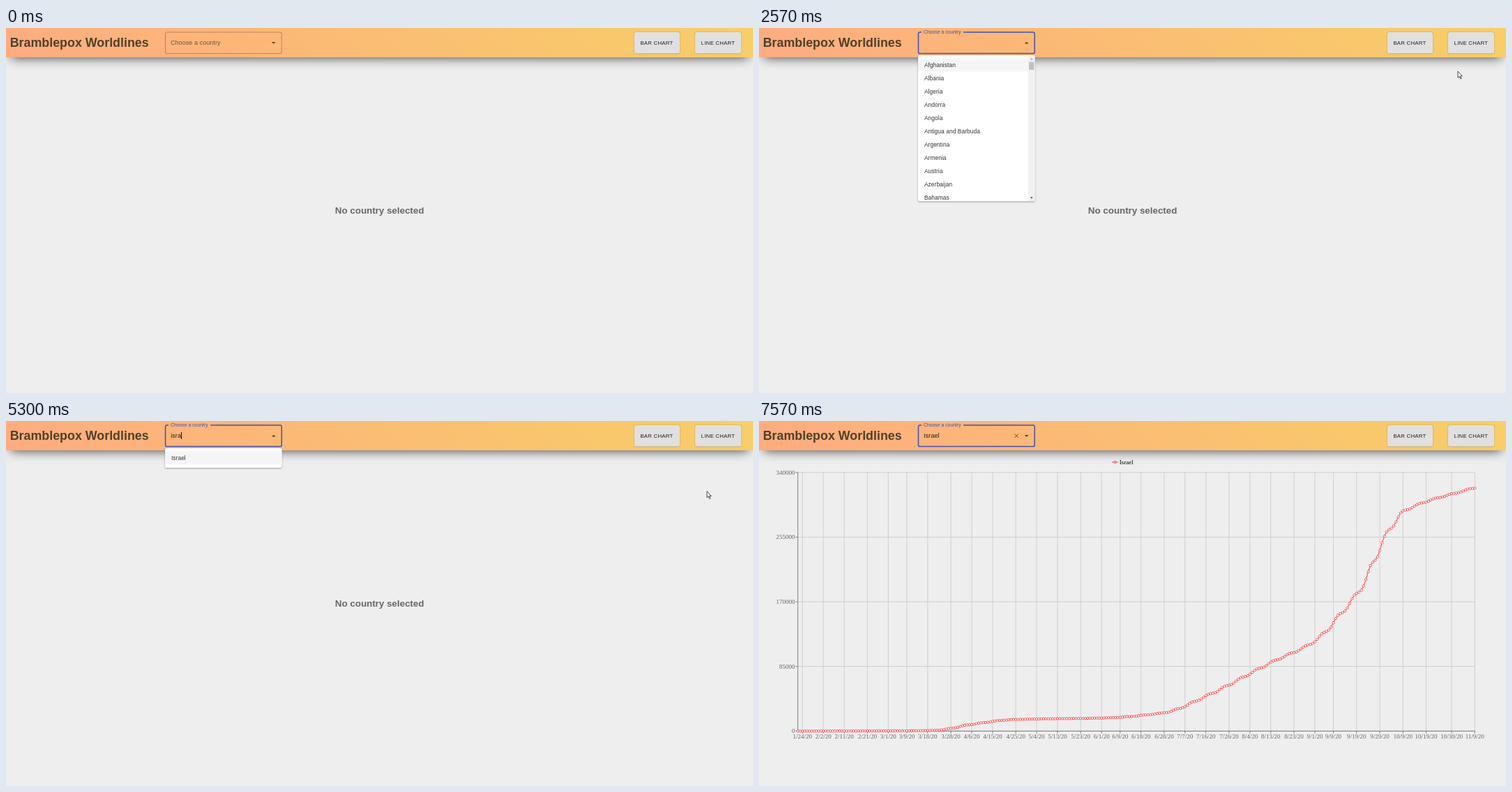
An HTML page that plays this animation: 1071 px wide and 523 px high, repeating every 8000 ms.

```html
<!DOCTYPE html>
<html lang="en">
<head>
<meta charset="utf-8">
<title>Bramblepox Worldlines</title>
<style>
html, body { margin: 0; width: 100%; height: 100%; overflow: hidden; background: #eee; }
header {
  position: absolute; left: 0; top: 0; width: 1071px; height: 42px;
  background: linear-gradient(45deg, #ffab80, #f7cf67);
  box-shadow: 0 8px 16px -7px rgba(0, 0, 0, .7);
}
svg { position: absolute; left: 0; top: 0; display: block; }
text { font-family: "Liberation Sans", Arial, sans-serif; white-space: pre; }
.title { font-size: 17.85px; font-weight: bold; fill: #4e412b; }
.field { font-size: 8.96px; letter-spacing: .084px; }
.option { font-size: 8.4px; letter-spacing: .07px; fill: #333; }
.button rect {
  fill: #e0e0e0;
  filter: drop-shadow(0 .8px .6px rgba(0, 0, 0, .3)) drop-shadow(0 .5px 1.2px rgba(0, 0, 0, .2));
}
.button text { font-size: 7.84px; letter-spacing: .224px; fill: #212121; }
.empty { font-size: 13.35px; font-weight: bold; fill: #666; text-anchor: middle; }
.paper { fill: #fff; filter: drop-shadow(0 1px 1px rgba(0, 0, 0, .35)); }
#chart text { font-family: "Liberation Serif", "Times New Roman", serif; font-size: 9px; fill: #666; }
.grid { stroke: #ccc; stroke-width: .9; fill: none; }
.axis { stroke: #666; stroke-width: .8; fill: none; }
.red { stroke: #f00; stroke-width: .75; fill: none; }
#dots circle { stroke: #f00; stroke-width: .6; fill: #fff; }
</style>
</head>
<body>
<header></header>
<svg width="1071" height="523" viewBox="0 0 1071 523">
  <defs>
    <clipPath id="selClip"><rect id="selArea" x="471.5" y="254" height="15.6"/></clipPath>
    <clipPath id="listClip"><rect id="listArea" x="228" y="39" width="167.5"/></clipPath>
  </defs>

  <text class="title" x="5.7" y="27">Bramblepox Worldlines</text>
  <g class="button">
    <rect x="901" y="6" width="65" height="30.5" rx="2.2"/><text x="909.4" y="24.2">BAR CHART</text>
    <rect x="988" y="6" width="66" height="30.5" rx="2.2"/><text x="996.6" y="24.2">LINE CHART</text>
  </g>

  <g id="empty">
    <text class="empty" x="535.6" y="266.3">No country selected</text>
    <g clip-path="url(#selClip)">
      <rect x="471.5" y="254" width="128.2" height="15.6" fill="#3390ff"/>
      <text class="empty" x="535.6" y="266.3" style="fill:#fff">No country selected</text>
    </g>
    <rect id="badge" x="529" y="275" width="13" height="13" fill="#45dcc0"/>
  </g>

  <g id="chart">
    <g id="axes"></g>
    <path id="line" class="red"/>
    <g id="dots"></g>
    <path class="red" d="M506.3 59H508.8M511.8 59H514.3"/>
    <circle class="red" cx="510.3" cy="59" r="1.5"/>
    <text x="516.7" y="61.8" style="fill:#000">Israel</text>
  </g>

  <path id="border" fill="none"/>
  <text id="label" class="field">Choose a country</text>
  <text id="input" class="field" x="236.2" y="24.2" fill="#212121"></text>
  <rect id="caret" y="16" width="1" height="10" fill="#111"/>
  <path id="arrow" fill="#000" fill-opacity=".65"/>
  <path id="clear" d="M366.3 18.4l5.6 5.6m0-5.6l-5.6 5.6" stroke="#000" stroke-opacity=".6" stroke-width=".9"/>

  <g id="menu">
    <rect id="paper" class="paper" x="228" y="39" width="167.5" rx="2.2"/>
    <rect id="active" x="228" y="43.5" height="19" fill="#f5f5f5"/>
    <g id="options" clip-path="url(#listClip)"></g>
    <g id="scroll">
      <rect x="386.2" y="39.5" width="9.3" height="208.5" fill="#f1f1f1"/>
      <rect x="387" y="48.6" width="7.3" height="11.4" fill="#c1c1c1"/>
      <path d="M388.8 45.5h4l-2-2.4z" fill="#a3a3a3"/>
      <path d="M388.8 242.3h4l-2 2.4z" fill="#505050"/>
    </g>
  </g>

  <path id="cursor" d="M0 0V9.2L2.1 7.4 3.6 10.8 4.9 10.2 3.5 6.9H6.2Z" fill="#fff" stroke="#111" stroke-width=".75"/>
</svg>
<script>
const LOOP = 8000, TICK = 200 / 3, BLINK = 530;
const PICK = 5960; // moment the country is chosen
const $ = id => document.getElementById(id);
const show = (id, on) => $(id).setAttribute('display', on ? 'inline' : 'none');
const set = (id, attrs) => { for (const k in attrs) $(id).setAttribute(k, attrs[k]); };
const mix = (a, b, p) => a + (b - a) * p;
const between = (t, a, b) => t >= a && t < b;
const progress = (t, a, b) => Math.min(1, Math.max(0, (t - a) / (b - a)));

function bezier(x1, y1, x2, y2) {
  const at = (a, b, s) => 3 * a * s * (1 - s) ** 2 + 3 * b * s * s * (1 - s) + s ** 3;
  return x => {
    let lo = 0, hi = 1;
    for (let i = 0; i < 24; i++) {
      const mid = (lo + hi) / 2;
      if (at(x1, x2, mid) < x) lo = mid; else hi = mid;
    }
    return at(y1, y2, lo);
  };
}
const ease = bezier(.25, .1, .25, 1);
const easeOut = bezier(0, 0, .2, 1);

// Chart
const LEFT = 55.7, RIGHT = 1026.3, TOP = 73.8, BOTTOM = 444.3, DAYS = 292;
const dayX = d => mix(LEFT, RIGHT, d / DAYS);

// Day and height of the curve at its main bends.
const bends = [[0, 0], [47, .4], [60, 1.2], [75, 9.7], [94, 16.7], [131, 18.7], [158, 26.3],
  [176, 50], [204, 98], [223, 129], [235, 171], [244, 211], [253, 276], [262, 316], [292, 349]];
const secant = i => (bends[i + 1][1] - bends[i][1]) / (bends[i + 1][0] - bends[i][0]);

function slope(i) {
  if (i === 0) return secant(0);
  if (i === bends.length - 1) return secant(i - 1);
  const a = secant(i - 1), b = secant(i);
  return 2 * a * b / (a + b);
}

function curveY(day) {
  // Counts rise more slowly at weekends.
  const d = Math.min(DAYS, Math.max(0, day - .75 * Math.sin(2 * Math.PI * (day - 262.5) / 7)));
  const i = Math.max(0, bends.findIndex(b => b[0] >= d) - 1);
  const [d0, h0] = bends[i], [d1, h1] = bends[i + 1];
  const span = d1 - d0, s = (d - d0) / span;
  return BOTTOM - mix(h0, h1, s * s * (3 - 2 * s))
    - span * s * (1 - s) * ((1 - s) * slope(i) - s * slope(i + 1));
}

function dateLabel(d) {
  const date = new Date(Date.UTC(2020, 0, 22 + d));
  return `${date.getUTCMonth() + 1}/${date.getUTCDate()}/20`;
}

// From the last day backwards, keep each date whose label has room.
function pickTicks() {
  const width = d => (dateLabel(d).length - 2) * 4.5 + 5;
  const days = [DAYS];
  for (let d = DAYS - 1; d > 0; d--) {
    const last = days[days.length - 1];
    if (dayX(last) - dayX(d) >= (width(last) + width(d)) / 2 + 2.8) days.push(d);
  }
  return days;
}

function buildChart() {
  let grid = '', ticks = '', labels = '';
  for (const d of pickTicks()) {
    const x = dayX(d).toFixed(2);
    grid += `M${x} ${TOP}V${BOTTOM}`;
    ticks += `M${x} ${BOTTOM}v3.4`;
    labels += `<text x="${x}" y="455" text-anchor="middle">${dateLabel(d)}</text>`;
  }
  for (let i = 0; i <= 4; i++) {
    const y = mix(BOTTOM, TOP, i / 4);
    grid += `M${LEFT} ${y}H${RIGHT}`;
    ticks += `M${LEFT} ${y}h-3.4`;
    labels += `<text x="51.4" y="${y + 3}" text-anchor="end">${i * 85000}</text>`;
  }
  $('axes').innerHTML = `<path class="grid" d="${grid}"/>` +
    `<path class="axis" d="${ticks}M${LEFT} ${TOP}V${BOTTOM}H${RIGHT}"/>` + labels;

  const points = Array.from({ length: DAYS + 1 }, (_, d) => [dayX(d).toFixed(2), curveY(d).toFixed(2)]);
  $('line').setAttribute('d', 'M' + points.map(p => p.join(' ')).join('L'));
  $('dots').innerHTML = points.map(([x, y]) => `<circle cx="${x}" cy="${y}" r="1.65"/>`).join('');
}
buildChart();
const lineLength = $('line').getTotalLength();

// Country menu, by typed text
const lists = {
  '': ['Afghanistan', 'Albania', 'Algeria', 'Andorra', 'Angola', 'Antigua and Barbuda',
    'Argentina', 'Armenia', 'Austria', 'Azerbaijan', 'Bahamas'],
  is: ['Afghanistan', 'Guinea-Bissau', 'Israel', 'Marshall Islands', 'Pakistan',
    'Saint Kitts and Nevis', 'Solomon Islands', 'Tajikistan', 'Tunisia', 'Uzbekistan']
};

function drawMenu(text) {
  const items = lists[text] || ['Israel'], full = text === '';
  const height = full ? 209.3 : 9 + 19 * items.length;
  set('paper', { height });
  set('listArea', { height });
  set('active', { width: full ? 158.2 : 167.5 });
  show('scroll', full);
  $('options').innerHTML = items.map((name, i) =>
    `<text class="option" x="236.9" y="${56 + 19 * i}">${name}</text>`).join('');
}

const edits = [[2030, ''], [3290, 'is'], [4090, 'isr'], [4230, 'isra'], [PICK, 'Israel']];

function drawField(t) {
  const focus = t >= 2030, hover = t >= 1630;
  const p = focus ? easeOut(progress(t, 2033, 2233)) : 0;
  set('border', {
    d: `M${233 + 60 * p} 6H393a2.2 2.2 0 0 1 2.2 2.2V34.4a2.2 2.2 0 0 1-2.2 2.2H230.7` +
      `a2.2 2.2 0 0 1-2.2-2.2V8.2a2.2 2.2 0 0 1 2.2-2.2H233`,
    stroke: focus ? '#3f51b5' : '#000',
    'stroke-opacity': focus ? 1 : hover ? .87 : .3,
    'stroke-width': focus ? 1.5 : .9
  });
  set('label', {
    transform: `translate(236 ${mix(24.2, 7.9, p)}) scale(${mix(1, .75, p)})`,
    fill: focus ? '#3f51b5' : '#000',
    'fill-opacity': focus ? 1 : .54
  });

  const [since, text] = edits.filter(e => e[0] <= t).pop() || edits[0];
  const open = focus && t < PICK;
  $('input').textContent = text;
  set('caret', { x: Math.round(236.2 + $('input').getComputedTextLength()) });
  show('caret', focus && Math.floor((t - since) / BLINK) % 2 === 0);
  set('arrow', { d: open ? 'M380.9 22.6h5.6l-2.8-2.8z' : 'M380.9 19.9h5.6l-2.8 2.8z' });
  show('clear', t >= PICK);
  drawMenu(text);
  show('menu', open);
  show('scroll', open && text === '');
}

// Time and position of the pointer's stops.
const stops = [[1433, 1053, 190], [1833, 1002, 62], [4900, 1002, 62], [5300, 1005, 100.6],
  [6300, 1005, 100.6], [6500, 1043.8, 97.2], [6700, 1073, 95]];

function drawCursor(t) {
  const i = Math.max(1, stops.findIndex(s => s[0] >= t));
  const [t0, x0, y0] = stops[i - 1], [t1, x1, y1] = stops[i];
  const p = progress(t, t0, t1);
  set('cursor', { transform: `translate(${mix(x0, x1, p)} ${mix(y0, y1, p)})` });
  show('cursor', between(t, 1430, 6690));
}

function drawBody(t) {
  const charted = t >= PICK;
  show('empty', !charted);
  show('chart', charted);
  set('selArea', { width: t < 2030 ? 128.2 * progress(t, 433, 967) : 0 });
  show('badge', between(t, 1230, 2030));

  const drawn = ease(progress(t, 5925, 7425));
  set('line', { 'stroke-dasharray': `${lineLength * drawn} ${lineLength + 1}` });
  show('dots', t >= 7560);
}

const start = performance.now();
function frame() {
  const elapsed = (performance.now() - start) % LOOP;
  // The picture changes only on half ticks.
  const t = (Math.floor(elapsed / TICK - .48) + .5) * TICK;
  drawField(t);
  drawBody(t);
  drawCursor(t);
  requestAnimationFrame(frame);
}
frame();
</script>
</body>
</html>
```
